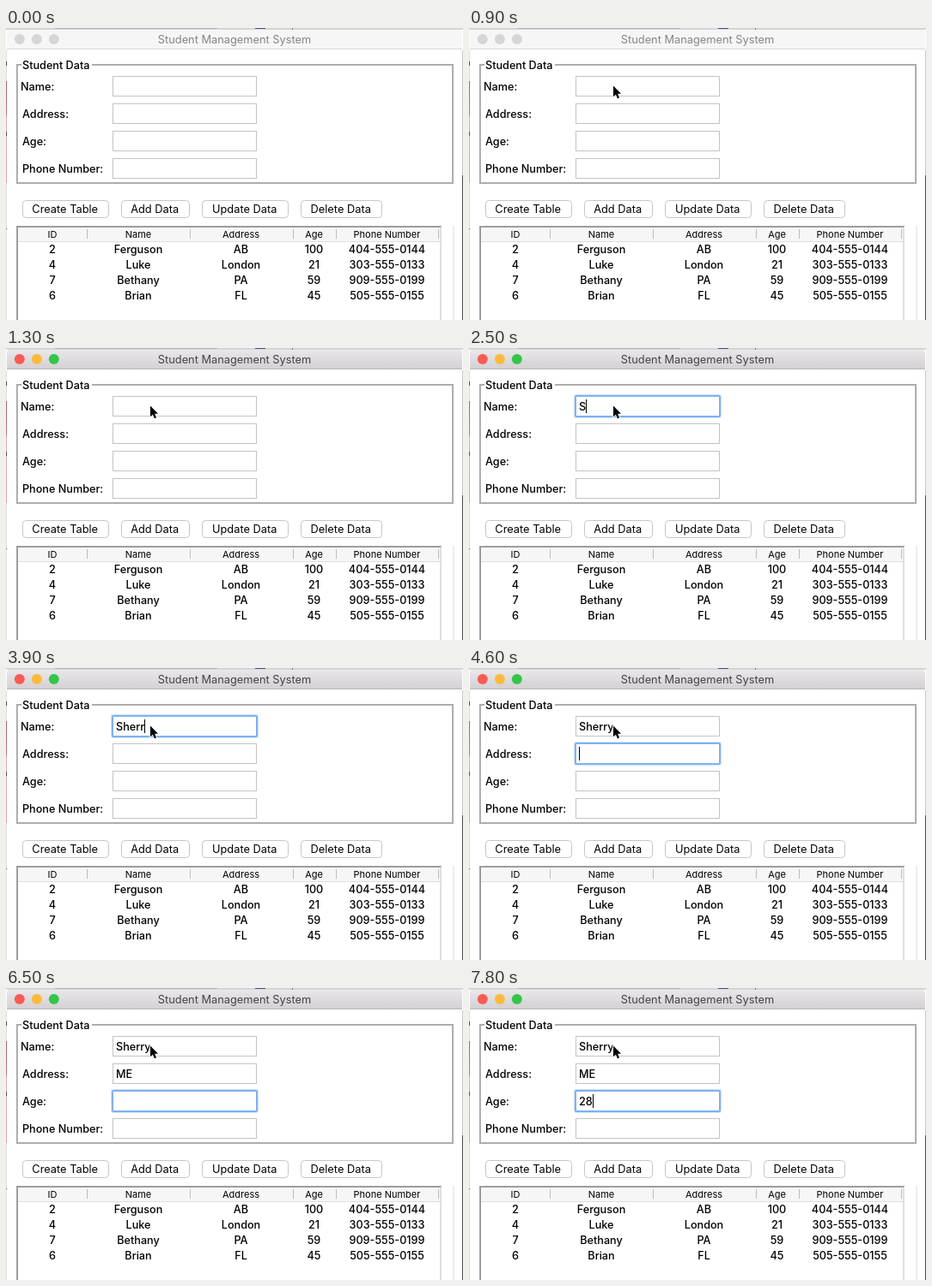
An HTML page that plays this animation: 532 by 341 pixels, repeating every 8 s.

```html
<!DOCTYPE html>
<html lang="en">
<head>
<meta charset="utf-8">
<title>Student Management System</title>
<style>
  html, body { margin: 0; width: 532px; height: 341px; overflow: hidden; background: #fff; }
  svg { display: block; }
  text { font: 500 12.65px Inter, "Liberation Sans", sans-serif; fill: #000; white-space: pre; }
  .mid { text-anchor: middle; }
  .plain { font-weight: 400; font-size: 12.8px; }
  .head { font-weight: 400; font-size: 11px; }
  .crisp { shape-rendering: crispEdges; }
  .line { fill: none; }

  #active, #blank { animation: 8s step-end infinite; }
  #active { animation-name: activate; }
  #blank { animation-name: blank; }
  @keyframes activate { 0% { opacity: 0; } 15%, 100% { opacity: 1; } }
  @keyframes blank { 0% { opacity: 0; } 15% { opacity: 1; } 16.25%, 100% { opacity: 0; } }
</style>
</head>
<body>
<svg id="stage" width="532" height="341" viewBox="0 0 532 341">
  <defs>
    <linearGradient id="bar" x2="0" y2="1">
      <stop stop-color="#e9e7e9"/><stop offset="1" stop-color="#d2d0d2"/>
    </linearGradient>
    <linearGradient id="edge" x2="0" y2="1">
      <stop stop-color="#a5636b"/><stop offset=".32" stop-color="#b9777d"/>
      <stop offset=".36" stop-color="#e0b0b4"/><stop offset="1" stop-color="#dba5ab"/>
    </linearGradient>
  </defs>

  <!-- desktop behind the window -->
  <g class="crisp">
    <rect width="532" height="2" fill="#d4d3d6"/>
    <path d="M57 0.5H246" stroke="#b4b2b8"/>
    <path d="M290 0.5H302" stroke="#5b4a86"/>
    <path d="M333.5 0V2" stroke="#777"/>
    <rect y="26" width="1" height="315" fill="#dedede"/>
    <rect y="62" width="1" height="119" fill="url(#edge)"/>
    <path d="M0.5 39V44M0.5 121V126M0.5 234V235" stroke="#555"/>
    <rect x="531" y="26" width="1" height="146" fill="#c9c9c9"/>
    <rect x="531" y="172" width="1" height="169" fill="#4a4a50"/>
  </g>

  <!-- title bar -->
  <path d="M1 25V6Q1 2 5 2H527Q531 2 531 6V25Z" fill="#f6f6f6"/>
  <path class="crisp" d="M1 24.5H531" stroke="#d9d9d9"/>
  <g fill="#d6d6d6">
    <circle cx="15.8" cy="13" r="6"/><circle cx="35.8" cy="13" r="6"/><circle cx="55.8" cy="13" r="6"/>
  </g>
  <text class="mid plain" x="266" y="18.2" style="fill:#858585">Student Management System</text>
  <g id="active">
    <path d="M1 25V6Q1 2 5 2H527Q531 2 531 6V25Z" fill="url(#bar)"/>
    <path class="crisp" d="M1 24.5H531" stroke="#b8b6b8"/>
    <circle cx="15.8" cy="13" r="6" fill="#fb5a55"/>
    <circle cx="35.8" cy="13" r="6" fill="#fcb93c"/>
    <circle cx="55.8" cy="13" r="6" fill="#34c648"/>
    <text class="mid plain" x="266" y="18.2" style="fill:#444">Student Management System</text>
  </g>

  <!-- group box -->
  <g class="crisp line">
    <path d="M18 42.5H12.5V181.5H520.5V42.5H100" stroke="#a8a8a8"/>
    <path d="M18 43.5H13.5V180.5H519.5V43.5H100" stroke="#b4b4b4"/>
  </g>
  <text x="19" y="47.7">Student Data</text>

  <g id="form"></g>
  <g id="buttons"></g>
  <g id="blank" class="crisp"></g>

  <!-- table frame -->
  <g class="crisp">
    <rect x="14" y="233" width="491" height="16" fill="#f6f6f6"/>
    <rect x="505" y="233" width="2" height="108" fill="#e0dee1"/>
    <rect x="520" y="231" width="2" height="110" fill="#efedf0"/>
    <path class="line" d="M14 249.5H505" stroke="#dedede"/>
    <path class="line" d="M12.5 341V231.5H506.5" stroke="#a2a2a2"/>
    <path class="line" d="M13.5 341V232.5H505.5" stroke="#989898"/>
    <path class="line" d="M94.5 235V246M214.5 235V246M334.5 235V246M384.5 235V246M503.5 235V246" stroke="#bcbcbc"/>
  </g>
  <g id="table"></g>

  <g id="ring" class="line" stroke="#7fb2ee">
    <rect x="123.5" y="-12.5" width="169" height="25" rx="1.5" stroke-width="3" opacity=".35"/>
    <rect x="124" y="-12" width="168" height="24" rx="1" stroke-width="2"/>
  </g>
  <rect id="caret" class="crisp" width="1" height="16"/>
  <path id="pointer" d="M0 0V12.8L2.9 10.2 4.9 14.8 7 13.9 5.1 9.3H9Z" stroke="#fff" stroke-width="1.6" paint-order="stroke"/>
</svg>
<script>
const LOOP = 8000;
const $ = id => document.getElementById(id);

function add(parent, tag, attrs, content = "") {
  const el = document.createElementNS("http://www.w3.org/2000/svg", tag);
  for (const key in attrs) el.setAttribute(key, attrs[key]);
  el.textContent = content;
  return $(parent).appendChild(el);
}

const rowY = row => 68 + 32 * row;

// Form labels and entry boxes
const entries = ["Name:", "Address:", "Age:", "Phone Number:"].map((label, row) => {
  const y = rowY(row);
  add("form", "text", { x: row ? 19 : 17, y: y + 4.7 }, label);
  add("form", "rect", { class: "crisp", x: 124.5, y: y - 11.5, width: 167, height: 23, fill: "#fff", stroke: "#c3c3c3" });
  return add("form", "text", { x: 128, y: y + 4.7 });
});

// Buttons and the plain blocks shown while they repaint
[["Create Table", 19, 101], ["Add Data", 134, 80], ["Update Data", 228, 101], ["Delete Data", 343, 95]]
  .forEach(([label, x, w]) => {
    add("buttons", "rect", { x: x + .5, y: 201.5, width: w - 1, height: 20, rx: 4, fill: "#fff", stroke: "#c6c6c6" });
    add("buttons", "text", { class: "mid plain", x: x + w / 2 - .8, y: 216.2 }, label);
    add("blank", "rect", { x: x - 6, y: 196, width: w + 12, height: 34, fill: "#e9e8ea" });
  });

// Table
const centers = [54, 154, 273.5, 358.5, 443.5];
const rows = [
  ["2", "Ferguson", "AB", "100", "404-555-0144"],
  ["4", "Luke", "London", "21", "303-555-0133"],
  ["7", "Bethany", "PA", "59", "909-555-0199"],
  ["6", "Brian", "FL", "45", "505-555-0155"]
];
["ID", "Name", "Address", "Age", "Phone Number"].forEach((label, i) =>
  add("table", "text", { class: "mid head", x: centers[i], y: 245 }, label));
rows.forEach((row, r) => row.forEach((cell, i) =>
  add("table", "text", { class: "mid", x: centers[i], y: 263 + 18 * r }, cell)));

// Input events: time, field, text so far
const events = [
  [1200, 0, ""], [2500, 0, "S"], [2700, 0, "Sh"], [3000, 0, "She"],
  [3700, 0, "Sher"], [3900, 0, "Sherr"], [4300, 0, "Sherry"],
  [4500, 1, ""], [4600, 1, ""], [5400, 1, "M"], [5600, 1, "ME"],
  [5900, 2, ""], [7500, 2, "2"], [7700, 2, "28"]
];

function movePointer(t) {
  const p = Math.min(1, (Math.floor(t / 100) * 100 - 300) / 600);
  const ease = 1 - (1 - p) ** 2.2;
  const x = 2 + 166 * ease;
  const y = 46 + 21.5 * ease + 3 * Math.sin(Math.PI * p) * p;
  $("pointer").setAttribute("transform", `translate(${x} ${y})`);
  $("pointer").style.opacity = t < 300 ? 0 : 1;
}

function render(t) {
  const values = ["", "", "", ""];
  let since = 0, field = 0;
  for (const [time, row, text] of events) {
    if (time > t) break;
    values[row] = text;
    field = row;
    since = time;
  }
  entries.forEach((el, i) => {
    if (el.textContent !== values[i]) el.textContent = values[i];
  });

  const focused = t >= 1800;
  const fading = t < 1900 || (t >= 4500 && t < 4600);
  $("ring").setAttribute("transform", `translate(0 ${rowY(field)})`);
  $("ring").style.opacity = focused ? (fading ? .55 : 1) : 0;

  const width = values[field] ? entries[field].getComputedTextLength() : 0;
  $("caret").setAttribute("x", Math.round(128 + width));
  $("caret").setAttribute("y", rowY(field) - 8);
  $("caret").style.opacity = focused && (t - since) % 900 < 600 ? 1 : 0;

  movePointer(t);
}

function tick() {
  const clock = document.timeline.currentTime ?? performance.now();
  render(clock % LOOP);
  requestAnimationFrame(tick);
}

// Keep the style animations on the same clock as the script
document.getAnimations().forEach(a => { a.startTime = 0; });
tick();
</script>
</body>
</html>
```
